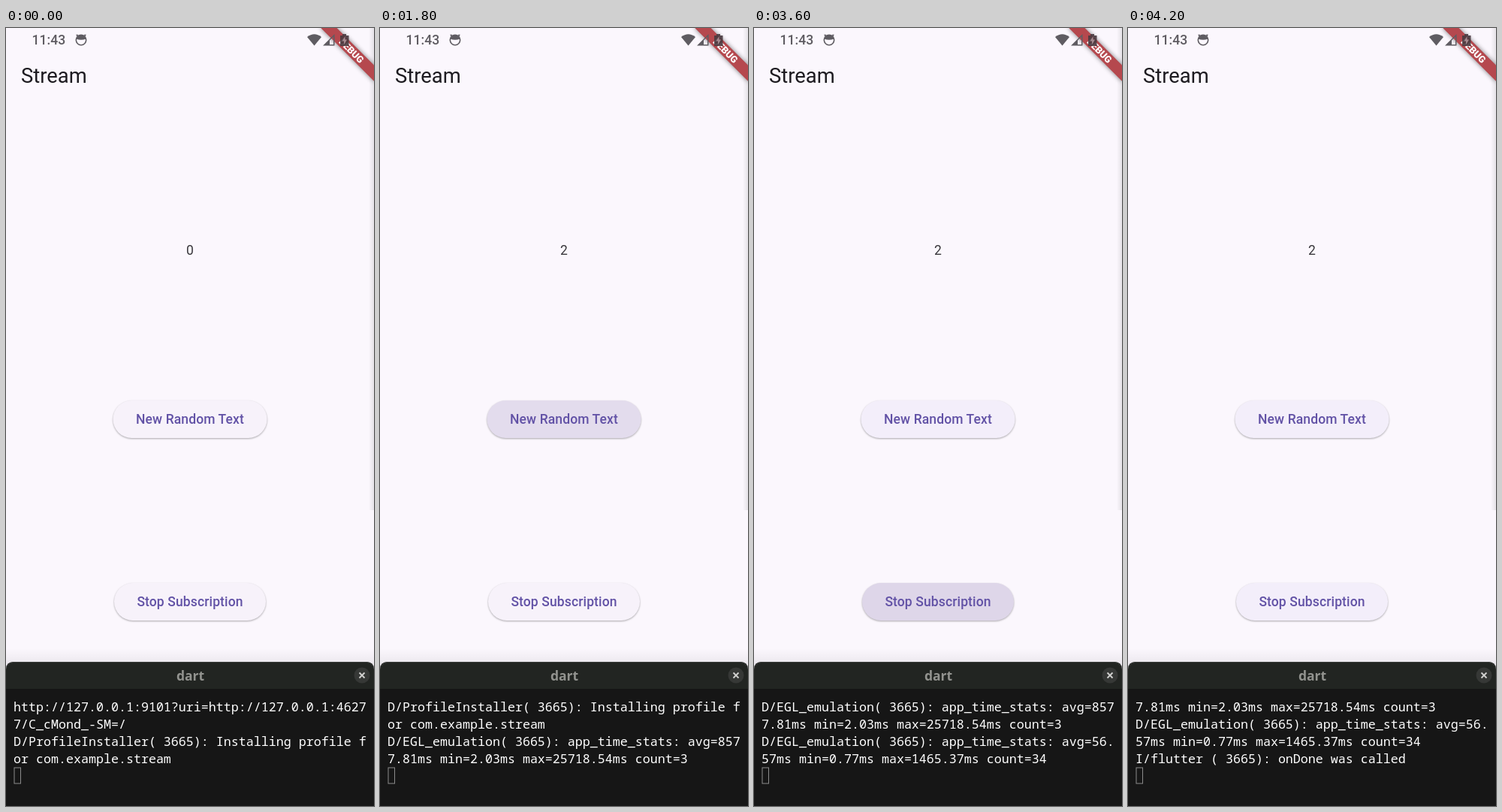
An HTML page that plays this animation: 490 px wide and 1036 px high, repeating every 7100 ms.

```html
<!DOCTYPE html>
<html lang="en">
<head>
<meta charset="utf-8">
<title>Stream</title>
<style>
html, body { margin: 0; width: 100%; height: 100%; overflow: hidden; background: #fbf7fd; }
svg { display: block; width: 490px; height: 1036px; font-family: Roboto, sans-serif; }
.mid { text-anchor: middle; }
.button rect { filter: drop-shadow(0 1px 1.2px rgba(0, 0, 0, .32)); }
.button text { font-size: 17.5px; font-weight: 500; letter-spacing: .12px; fill: #6252a6; }
.log { font: 16.67px "Noto Sans Mono", monospace; fill: #fff; white-space: pre; }
</style>
</head>
<body>
<svg viewBox="0 0 490 1036">
  <defs>
    <linearGradient id="edge">
      <stop stop-color="#000" stop-opacity="0"/>
      <stop offset="1" stop-color="#000" stop-opacity=".09"/>
    </linearGradient>
    <linearGradient id="above" x2="0" y2="1">
      <stop stop-color="#000" stop-opacity="0"/>
      <stop offset="1" stop-color="#000" stop-opacity=".07"/>
    </linearGradient>
    <filter id="soft" x="-20%" y="-80%" width="140%" height="260%"><feGaussianBlur stdDeviation="3"/></filter>
  </defs>

  <rect width="490" height="1036" fill="#fbf7fd"/>
  <rect x="483" width="7" height="642" fill="url(#edge)"/>

  <text x="20" y="73" font-size="27.4" fill="#1d1b20">Stream</text>
  <text id="count" class="mid" x="245" y="301.5" font-size="17.5" fill="#39373c">0</text>

  <g class="button">
    <rect id="newText" x="142.5" y="496" width="205" height="50" rx="25"/>
    <text class="mid" x="245" y="527">New Random Text</text>
  </g>
  <g class="button">
    <rect id="stop" x="144" y="739" width="202" height="50" rx="25"/>
    <text class="mid" x="245" y="770">Stop Subscription</text>
  </g>

  <g transform="translate(490 0) rotate(45)">
    <rect x="-50" y="35" width="100" height="15" opacity=".5" filter="url(#soft)"/>
    <rect x="-50" y="35" width="100" height="15" fill="#b5484e"/>
    <text class="mid" y="47" font-size="12.7" font-weight="900" fill="#fff">DEBUG</text>
  </g>

  <g fill="#5f5c62">
    <text x="34.5" y="22" font-size="17.6" font-weight="500">11:43</text>
    <circle cx="100" cy="16" r="6.7" fill="none" stroke="#5f5c62" stroke-width="1.6"/>
    <path d="M93.5 14.5A6.7 6.7 0 0 1 106.500 14.500Q100 17 93.500 14.500ZM93.500 8.500l3 .5-2.500 2.500ZM106.500 8.500l-3 .5 2.500 2.500Z"/>
    <path d="M401 12Q410.500 4.500 420 12L410.500 23.500Z"/>
    <path fill-rule="evenodd" d="M422 23.500L437.500 8V23.500ZM431 22H436V11.500L431 16.500Z"/>
    <path d="M445 10h3v-2h5v2h3.500v14H445Z" fill="#493a40" opacity=".9"/>
    <path d="M451.500 11l-4 6.500h2.500v4.500l4-6.500h-2.500Z" fill="#a78a90"/>
  </g>

  <rect y="826" width="490" height="24" fill="url(#above)"/>
  <path d="M0 1036V854Q0 844 10 844H480Q490 844 490 854V1036Z" fill="#222522"/>
  <path d="M2 849Q5 844.500 10 844.500H480Q485 844.500 488 849" fill="none" stroke="#3b3d3b"/>
  <rect y="880" width="490" height="156" fill="#161616"/>
  <text class="mid" x="245.500" y="869" font-family="Noto Sans, sans-serif" font-size="17.5" font-weight="600" fill="#92938f">dart</text>
  <circle cx="474" cy="862" r="10.500" fill="#363836"/>
  <path d="M470.500 858.500l7 7m0-7l-7 7" stroke="#d2d2d0" stroke-width="1.800"/>
  <g id="log"></g>
  <rect x="11" y="985" width="8.500" height="21" fill="none" stroke="#8c8c8c"/>
</svg>
<script>
const LOOP = 7100, STEP = 100;
const $ = id => document.getElementById(id);

const lines = [
  "http://127.0.0.1:9101?uri=http://127.0.0.1:4627",
  "7/C_cMond_-SM=/",
  "D/ProfileInstaller( 3665): Installing profile f",
  "or com.example.stream",
  "D/EGL_emulation( 3665): app_time_stats: avg=857",
  "7.81ms min=2.03ms max=25718.54ms count=3",
  "D/EGL_emulation( 3665): app_time_stats: avg=56.",
  "57ms min=0.77ms max=1465.37ms count=34",
  "I/flutter ( 3665): onDone was called"
];

const rows = [0, 1, 2, 3].map(i => {
  const row = document.createElementNS("http://www.w3.org/2000/svg", "text");
  row.setAttribute("class", "log");
  row.setAttribute("x", 10);
  row.setAttribute("y", 910 + 23 * i);
  return $("log").appendChild(row);
});

const idle = [247, 242, 250], focus = [243, 238, 250], pressed = [222, 214, 233];
const mix = (a, b, k) => a.map((v, i) => v + (b[i] - v) * k);

// Ink fills at once, holds briefly, then fades to the focused tint
function buttonColor(t, down, hold) {
  if (t < down) return idle;
  const fade = Math.min(1, Math.max(0, (t - down - hold) / (500 - hold)));
  return mix(pressed, focus, fade);
}

function draw(now) {
  const t = Math.floor((now % LOOP) / STEP) * STEP;
  const first = t < 1500 ? 0 : t < 3500 ? 2 : t < 3700 ? 4 : 5;
  rows.forEach((row, i) => row.textContent = lines[first + i]);
  $("count").textContent = t < 1700 ? 0 : 2;
  $("newText").style.fill = `rgb(${buttonColor(t, 1600, 100)})`;
  $("stop").style.fill = `rgb(${buttonColor(t, 3600, 100)})`;
}

const start = performance.now();
function tick() {
  draw(performance.now() - start);
  requestAnimationFrame(tick);
}
tick();
</script>
</body>
</html>
```
